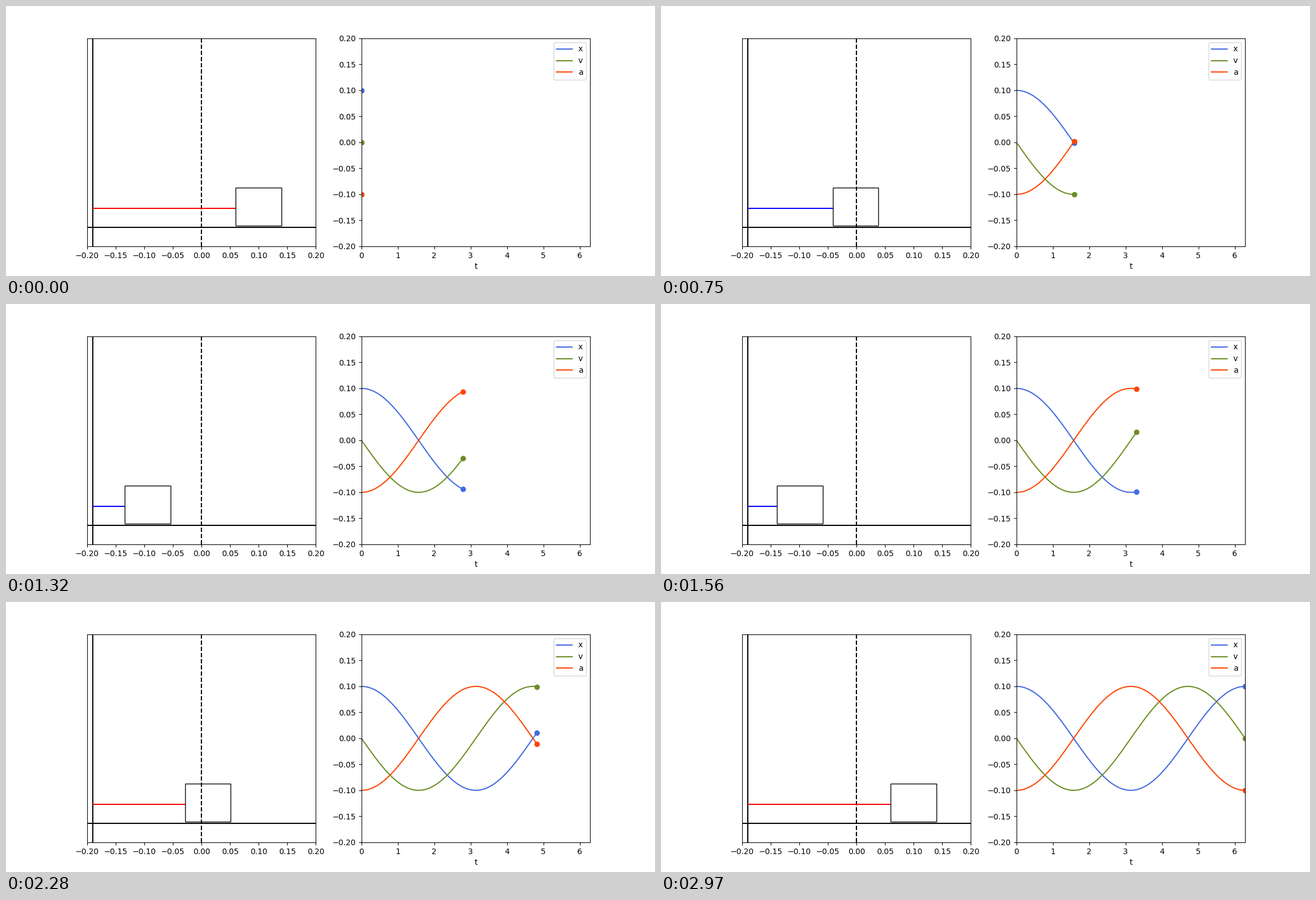
Animation, 1159 px wide and 483 px high, one loop 3000 ms. Source, as a matplotlib script:

```python
import matplotlib.pyplot as plt
import numpy as np
from matplotlib.animation import FuncAnimation
from matplotlib.patches import Rectangle

plt.rcParams["font.family"] = "DejaVu Sans"

WIDTH, HEIGHT, DPI = 1159, 483, 100
FRAMES, INTERVAL = 100, 30
AMPLITUDE, LIMIT = 0.1, 0.2
WALL, SPRING_Y = -0.19, 0.01
BOX_W, BOX_H, BOX_Y = 0.08, 0.02, 0.001

# Harmonic oscillator with unit angular frequency
t = np.linspace(0, 2 * np.pi, FRAMES)
position = AMPLITUDE * np.cos(t)
curves = {
    "x": (position, "royalblue"),
    "v": (-AMPLITUDE * np.sin(t), "olivedrab"),
    "a": (-position, "orangered"),
}

# The small margin keeps the pixel size from truncating downwards
fig, (scene, graph) = plt.subplots(
    1, 2, figsize=(WIDTH / DPI + 1e-6, HEIGHT / DPI + 1e-6), dpi=DPI
)

scene.set(xlim=(-LIMIT, LIMIT), ylim=(-0.01, 0.1), yticks=[])
scene.axvline(WALL, color="black")
scene.axhline(0, color="black")
scene.axvline(0, color="black", linestyle="--")
box = scene.add_patch(
    Rectangle((0, BOX_Y), BOX_W, BOX_H, fill=False, edgecolor="black", linewidth=1)
)
spring, = scene.plot([], [], solid_capstyle="butt")

graph.set(xlim=(0, 2 * np.pi), ylim=(-LIMIT, LIMIT), xlabel="t")
lines = [graph.plot([], [], color=c, label=name)[0] for name, (_, c) in curves.items()]
dots = [graph.plot([], [], "o", color=c)[0] for _, c in curves.values()]
graph.legend(loc="upper right")


def update(i):
    left = position[i] - BOX_W / 2
    box.set_x(left)
    spring.set_data([WALL, left], [SPRING_Y, SPRING_Y])
    spring.set_color("red" if position[i] > 0 else "blue")
    for line, dot, (values, _) in zip(lines, dots, curves.values()):
        line.set_data(t[: i + 1], values[: i + 1])
        dot.set_data([t[i]], [values[i]])
    return [box, spring, *lines, *dots]


animation = FuncAnimation(
    fig, update, frames=FRAMES, interval=INTERVAL, repeat=True, repeat_delay=0
)
plt.show()
```
